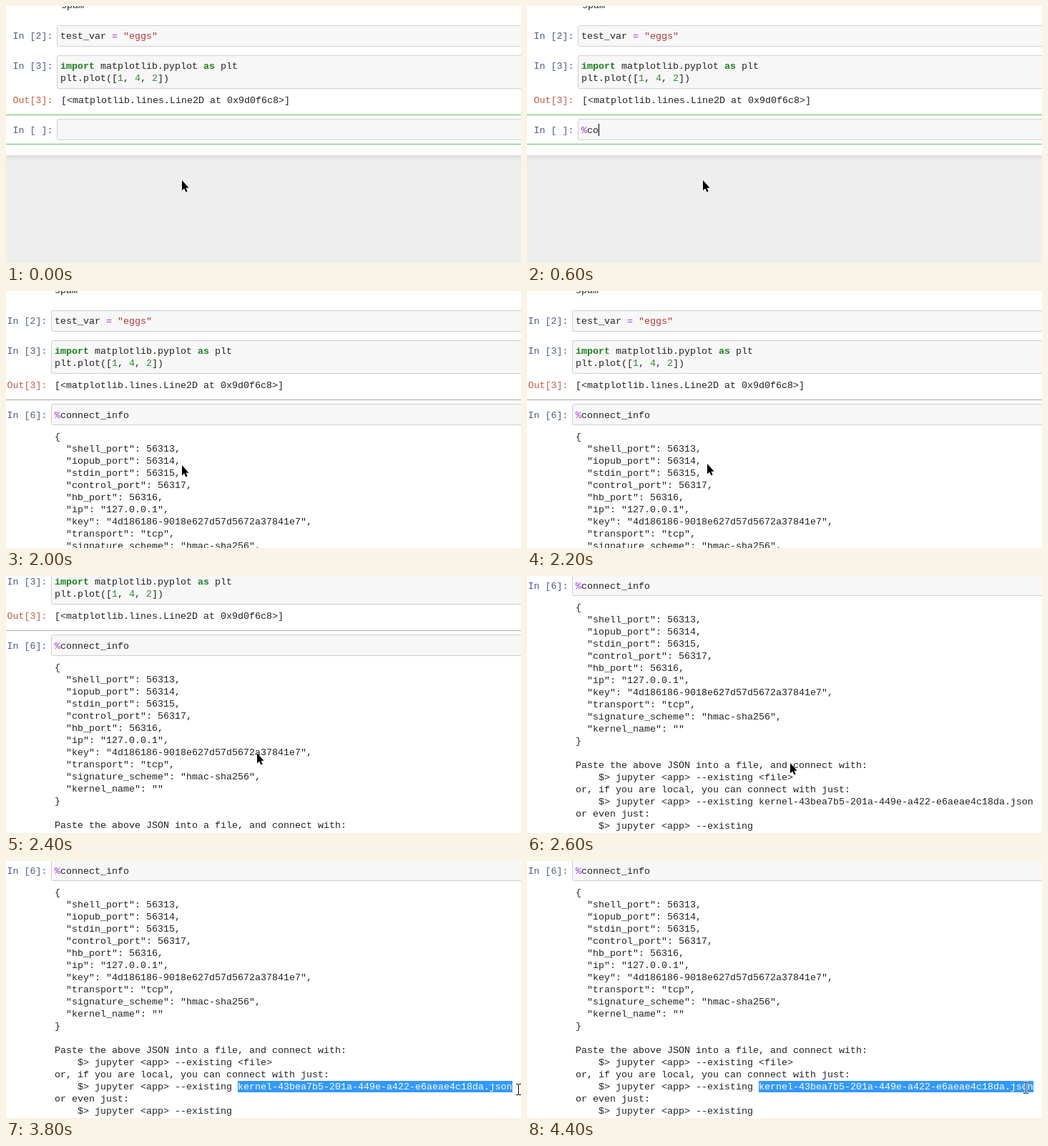
Animation, 720 px wide and 360 px high, one loop 5800 ms. Source, as an HTML page:

```html
<!DOCTYPE html>
<html lang="en">
<head>
<meta charset="utf-8">
<title>Notebook: connect_info</title>
<style>
  html, body { margin: 0; width: 100%; height: 100%; overflow: hidden; background: #fff; }
  svg { display: block; width: 100%; height: 100%; }
  text { font: 13.333px "Liberation Mono", "Courier New", monospace; white-space: pre; fill: #222; }
  .in { fill: #4c5a8c; }
  .out { fill: #be5f42; }
  .kw { fill: #1c821c; font-weight: bold; }
  .num { fill: #2a8f2a; }
  .str { fill: #b03a3a; }
  .op { fill: #a035d8; }
  .sel { fill: #fff; }
  .box { fill: #f7f7f7; stroke: #cfcfcf; }
</style>
</head>
<body>
<svg id="stage" viewBox="0 0 720 360"></svg>
<script>
const LOOP = 5800, CHAR = 8, LINE = 17;
const COMMAND = '%connect_info';
const KERNEL = 'kernel-43bea7b5-201a-449e-a422-e6aeae4c18da.json';
const OUTPUT = `{
  "shell_port": 56313,
  "iopub_port": 56314,
  "stdin_port": 56315,
  "control_port": 56317,
  "hb_port": 56316,
  "ip": "127.0.0.1",
  "key": "4d186186-9018e627d57d5672a37841e7",
  "transport": "tcp",
  "signature_scheme": "hmac-sha256",
  "kernel_name": ""
}

Paste the above JSON into a file, and connect with:
    $> jupyter <app> --existing <file>
or, if you are local, you can connect with just:
    $> jupyter <app> --existing 
or even just:
    $> jupyter <app> --existing`.split('\n');
const KERNEL_LINE = 16;

// Each step changes part of the state at its time in ms.
const steps = [
  [0, { typed: 0, caret: false, ran: false, scroll: 0, selected: 0, pointer: 'arrow', at: [246, 244] }],
  [200, { caret: true }],
  [400, { typed: 1 }],
  [600, { typed: 3 }],
  [800, { typed: 6 }],
  [1000, { typed: 8 }],
  [1400, { typed: 10 }],
  [1600, { typed: 13 }],
  [2000, { ran: true, caret: false }],
  [2200, { at: [252, 242] }],
  [2400, { scroll: 76, at: [351, 248] }],
  [2600, { scroll: 160, at: [368, 262] }],
  [2800, { pointer: 'beam', at: [293, 314] }],
  [3000, { at: [335, 305] }],
  [3200, { at: [326, 305] }],
  [3400, { at: [328, 305] }],
  [3600, { selected: 40, at: [646, 307] }],
  [3800, { selected: KERNEL.length, at: [716, 312] }],
  [4200, { at: [694, 310] }],
  [4400, { at: [697, 310] }],
];

const escape = s => s.replace(/</g, '&lt;');
const span = (cls, s) => `<tspan class="${cls}">${escape(s)}</tspan>`;
// y is the vertical middle of the text line.
const text = (x, y, content, cls = '') => `<text x="${x}" y="${y + 4}" class="${cls}">${content}</text>`;
const rect = (x, y, w, h, fill) => `<rect x="${x}" y="${y}" width="${w}" height="${h}" fill="${fill}"/>`;
const inputBox = (x, y, h) => `<rect class="box" x="${x + .5}" y="${y + .5}" width="800" height="${h}" rx="2"/>`;

const importLine = `${span('kw', 'import')} matplotlib.pyplot ${span('kw', 'as')} plt`;
const plotLine = `plt.plot([${[1, 4, 2].map(n => span('num', String(n))).join(', ')}])`;

const pointers = {
  arrow: '<path d="M0 0V14.5L3.2 11.5L5.4 16.5L7.6 15.5L5.5 10.7H9.5Z" stroke="#fff" paint-order="stroke"/>',
  beam: [['#fff', 3], ['#000', 1]].map(([color, width]) =>
    `<path d="M-3 .5H0M1 .5H4M.5 1V15M-3 15.5H0M1 15.5H4" fill="none" stroke="${color}" stroke-width="${width}"/>`).join(''),
};

function cells(s) {
  const shift = s.ran ? 8 : 0;
  const prompt = 9.5 - shift, box = 71 - shift, code = 76 - shift, result = s.ran ? 68 : 77;
  const command = COMMAND.slice(0, s.typed);
  return [
    text(result, -1, 'spam'),
    inputBox(box, 27, 29),
    text(prompt, 42, 'In [2]:', 'in'),
    text(code, 42, `test_var ${span('op', '=')} ${span('str', '"eggs"')}`),
    inputBox(box, 69, 46),
    text(prompt, 84, 'In [3]:', 'in'),
    text(code, 84, importLine),
    text(code, 84 + LINE, plotLine),
    text(prompt, 132, 'Out[3]:', 'out'),
    text(result, 132, escape('[<matplotlib.lines.Line2D at 0x9d0f6c8>]')),
    rect(0, 152, 720, 1, s.ran ? '#ababab' : '#66bb6a'),
    inputBox(box, 158, 29),
    text(prompt, 174, s.ran ? 'In [6]:' : 'In [ ]:', 'in'),
    text(code, 174, span('op', command.slice(0, 1)) + command.slice(1)),
    s.caret ? rect(code + s.typed * CHAR, 165, 1, 17, '#000') : '',
    s.ran ? output(s.selected) : pageEnd(),
  ].join('');
}

function output(selected) {
  const x = 68, top = 204;
  const highlight = rect(x + OUTPUT[KERNEL_LINE].length * CHAR, top + KERNEL_LINE * LINE - 8,
    selected * CHAR, 16, '#3399ff');
  return highlight + OUTPUT.map((line, i) => {
    const kernel = i === KERNEL_LINE ? span('sel', KERNEL.slice(0, selected)) + KERNEL.slice(selected) : '';
    return text(x, top + i * LINE, escape(line) + kernel);
  }).join('');
}

function pageEnd() {
  return `<linearGradient id="shadow" x2="0" y2="1">
      <stop stop-color="#575757" stop-opacity=".12"/><stop offset="1" stop-color="#575757" stop-opacity="0"/>
    </linearGradient>`
    + rect(0, 193, 720, 1, '#66bb6a')
    + rect(0, 209, 720, 151, '#eee')
    + rect(0, 209, 720, 8, 'url(#shadow)');
}

const stage = document.getElementById('stage');
const start = performance.now();
let shown = -1;

function draw() {
  const t = (performance.now() - start) % LOOP;
  const count = steps.filter(([time]) => time <= t).length;
  if (count !== shown) {
    shown = count;
    const s = Object.assign({}, ...steps.slice(0, count).map(step => step[1]));
    stage.innerHTML = `<g transform="translate(0 ${-s.scroll})">${cells(s)}</g>
      <g transform="translate(${s.at})">${pointers[s.pointer]}</g>`;
  }
  requestAnimationFrame(draw);
}
draw();
</script>
</body>
</html>
```
